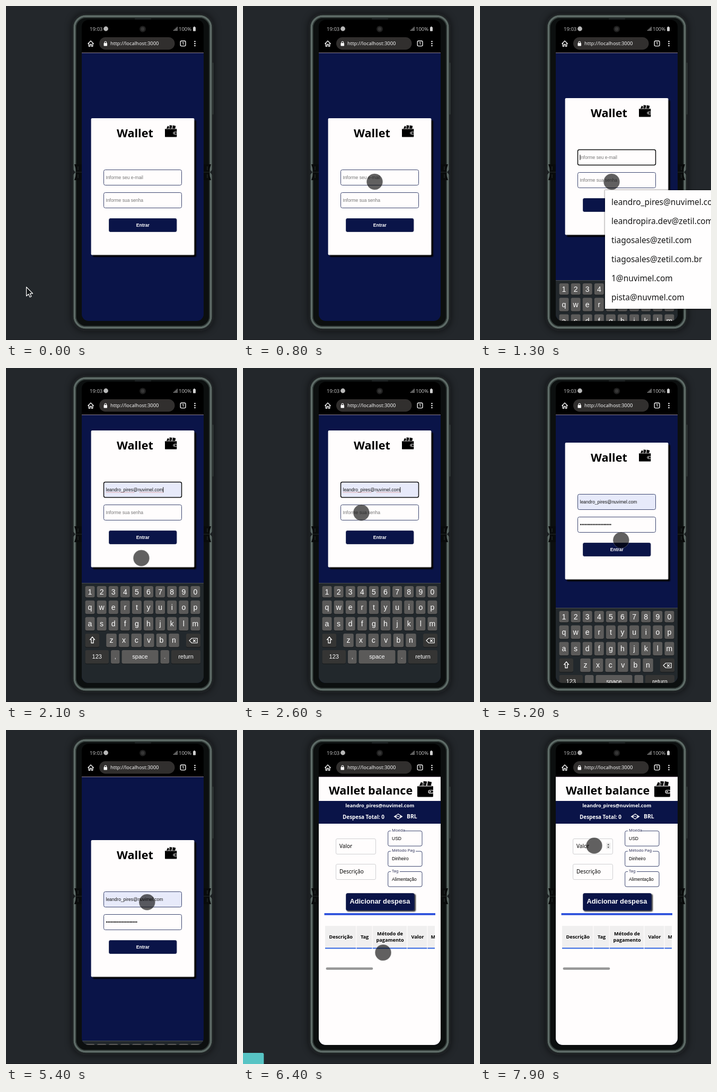
Recreate the animation shown at these times as an HTML page. Size 436 px wide and 631 px high, loop 8 s.

```html
<!DOCTYPE html>
<html lang="pt-BR">
<head>
<meta charset="utf-8">
<title>Wallet</title>
<style>
  html, body { margin: 0; width: 100%; height: 100%; overflow: hidden; background: #23272b; }
  svg { display: block; width: 100vw; height: 100vh; }
  text { white-space: pre; }
  .ui { font-family: "Noto Sans", "Open Sans", sans-serif; }
  .bold { font-family: "Open Sans", "Noto Sans", sans-serif; font-weight: 700; }
  .form { font-family: "Liberation Sans", Arial, sans-serif; font-size: 8.5px; }
  .mid { text-anchor: middle; }
</style>
</head>
<body>
<svg id="stage" viewBox="0 0 436 631" xmlns="http://www.w3.org/2000/svg"></svg>
<script>
const LOOP = 8000, STEP = 100;
const NAVY = '#0a1448', PAPER = '#fffdfd', LINE = '#3b456f';
const EMAIL = 'leandro_pires@nuvimel.com';
const SUGGESTIONS = [EMAIL, 'leandropira.dev@zetil.com', 'tiagosales@zetil.com',
  'tiagosales@zetil.com.br', '1@nuvimel.com', 'pista@nuvmel.com'];

// markup helpers
const rect = (x, y, w, h, fill, more = '') =>
  `<rect x="${x}" y="${y}" width="${w}" height="${h}" fill="${fill}" ${more}/>`;
const label = (x, y, str, cls, size, fill = '#000', more = '') =>
  `<text x="${x}" y="${y}" class="${cls}" style="font-size:${size}px" fill="${fill}" ${more}>${str}</text>`;
const path = (d, more) => `<path d="${d}" ${more}/>`;
const dot = (x, y, r, fill) => `<circle cx="${x}" cy="${y}" r="${r}" fill="${fill}"/>`;
const pen = (color, width = 1) => `fill="none" stroke="${color}" stroke-width="${width}"`;
const each = (list, fn) => list.map(fn).join('');

const defs = `<defs>
  <clipPath id="screen"><rect x="143" y="26" width="230" height="569" rx="13"/></clipPath>
  <clipPath id="table"><rect x="155" y="365" width="207" height="60"/></clipPath>
  <filter id="blur" x="-20%" y="-20%" width="140%" height="140%"><feGaussianBlur stdDeviation="7"/></filter>
  <filter id="soft" x="-10%" y="-10%" width="120%" height="120%"><feGaussianBlur stdDeviation="1.2"/></filter>
</defs>`;

function phone() {
  // nested outlines from the outer edge inwards
  const ring = (inset, color, width) => rect(126.5 + inset, 16.5 + inset, 263 - inset * 2, 594 - inset * 2,
    'none', `rx="${24 - inset}" stroke="${color}" stroke-width="${width}"`);
  const hinge = path('M126 308 131 314 126 320Z', 'fill="#1c2022"') +
    path('M129 299H143V329H129L132 319V309Z', 'fill="#090b0b"') +
    path('M132 314H143M136 303V310M136 318V325', pen('#262c2b', 1.2));
  return rect(0, 630, 436, 1, '#191c1f') +
    rect(124, 14, 268, 600, '#0d0f11', 'rx="26" opacity=".6" filter="url(#blur)"') +
    rect(389, 107, 2.5, 98, '#343d3a', 'rx="1"') +
    rect(126.5, 16.5, 263, 594, '#0c0f0f', 'rx="24"') +
    ring(.5, '#2f3836', 1.2) + ring(2.8, '#5f6c68', 3.4) + ring(5.4, '#333d3a', 1.6) +
    rect(243, 23, 31, 2.5, '#1d2122', 'rx="1.2"') +
    hinge + `<g transform="matrix(-1 0 0 1 516 0)">${hinge}</g>`;
}

function chrome() {
  let s = rect(143, 26, 230, 63, '#000');
  s += label(158, 47, '19:03', 'ui', 9.5, '#bdbdbd') + dot(188.5, 43, 4.4, '#b8b8b8');
  s += dot(258, 43.5, 6, '#1f1f1f') + dot(258, 43.5, 3.4, '#363636');
  for (let i = 0; i < 4; i++) s += rect(316 + i * 2.1, 45 - i * 1.9, 1.4, 2 + i * 1.9, '#8d8d8d');
  s += label(326, 47, '100%', 'ui', 9.5, '#bdbdbd');
  s += rect(353, 40, 5, 7.5, '#d0d0d0', 'rx=".8"') + rect(354.3, 38.8, 2.4, 2, '#d0d0d0');
  s += path('M154.5 71.5 160 66 165.5 71.5M156.3 70V76H158.6V72.5H161.4V76H163.7V70', pen('#fff', 1.3));
  s += rect(176, 59, 142.5, 23.5, '#312f2e', 'rx="11.7"');
  s += rect(184.5, 70, 6.5, 5.5, '#fff', 'rx=".8"') + path('M186 70V68.8a1.8 1.8 0 0 1 3.6 0V70', pen('#fff', 1.1));
  s += label(197, 74, 'http://localhost:3000', 'ui', 9.4, '#f4f4f4');
  s += rect(329.2, 66, 9.8, 9.6, 'none', 'rx="2" stroke="#fff" stroke-width="1.3"');
  s += label(334.1, 73.3, '1', 'bold mid', 6.5, '#fff');
  s += each([67, 71, 75], y => dot(356.5, y, 1.25, '#fff'));
  return s + rect(143, 88, 230, 1, '#8d7f90');
}

function purse(x, y, k) {
  return `<g transform="translate(${x} ${y}) scale(${k})">` +
    path('M2.5 8 5 2.2 9.5 4 8.5 8ZM6.5 8 8.8.8 14 1.6 12.6 8ZM13.5 8 14.6 1 20.6 2.4 19.5 8Z',
      `fill="#000" stroke="${PAPER}" stroke-width=".6"`) +
    rect(0, 8, 22.3, 15.6, '#000', 'rx="1.2"') + path('M1 8.6H21', pen(PAPER, .4)) +
    rect(15.8, 14, 7, 4.2, '#000', `rx="2" stroke="${PAPER}" stroke-width=".9"`) +
    dot(18.2, 16.1, .9, PAPER) + '</g>';
}

function login() {
  const input = (id, y) => rect(184.5, y, 147, 29, PAPER, `id="${id}Box" rx="3"`) +
    `<text id="${id}" x="188.5" y="${y + 17.5}" class="form"></text>`;
  return rect(143, 88, 230, 507, NAVY) + '<g id="card">' +
    rect(164, 4, 195, 258, '#000', 'rx="2" filter="url(#soft)"') +
    rect(160.6, 0, 194.8, 258.5, PAPER, 'rx="2"') +
    path('M162 258.2H355.2V1', pen('#8a8a90', .8)) +
    label(209, 36, 'Wallet', 'bold', 21.6) + purse(300, 12, 1) +
    input('mail', 97.5) + input('pass', 140.5) +
    path('M189 117H243M252 117H297', pen('#d0564f', .9) + ' id="spell" stroke-dasharray="1 1"') +
    rect(0, 0, .9, 10, '#000', 'id="caret"') +
    rect(194.5, 189.5, 127.5, 25, NAVY, 'rx="2.5" stroke="#30375e"') +
    label(258.3, 205, 'Entrar', 'form mid', 8.5, '#fff', 'font-weight="700"') + '</g>';
}

function keyboard() {
  const DARK = '#353534', PITCH = 31.25;
  let s = rect(143, 0, 230, 190, '#22282c') + rect(143, 0, 230, 1, '#4a4e50');
  const key = (row, x, w, str, size = 14, fill = '#5b5a59') => {
    const y = Math.max(6, 2 + row * PITCH), h = 27.5 + row * PITCH - y;
    s += rect(x, y + 1, w, h, '#15181a', 'rx="3"') + rect(x, y, w, h, fill, 'rx="3"') +
      label(x + w / 2, y + h / 2 + size * .34, str, 'form mid', size, '#fff');
  };
  ['1234567890', 'qwertyuiop', 'asdfghjklm'].forEach((keys, row) =>
    [...keys].forEach((c, i) => key(row, 149.5 + i * 22.1, 18, c)));
  [...'zxcvbn'].forEach((c, i) => key(3, 189.2 + i * 23.6, 19.6, c));
  key(3, 149.5, 26.5, '', 14, DARK);
  key(3, 340, 27, '', 14, DARK);
  key(4, 149.5, 44.5, '123', 11, DARK);
  key(4, 198, 16.5, ',', 11);
  key(4, 218.5, 69, 'space', 11);
  key(4, 291.5, 16.5, '.', 11);
  key(4, 312, 55, 'return', 11, DARK);
  s += path('M163 102 167.2 107.2H165V113.5H161V107.2H158.8Z', pen('#fff', 1.3));
  s += path('M346 109 350.5 104.5H361V113.5H350.5ZM353 106.7 358 111.5M358 106.7 353 111.5', pen('#fff', 1.2));
  return `<g id="keys">${s}</g>`;
}

function balance() {
  let s = rect(143, 89, 230, 506, PAPER) + rect(143, 88, 230, 1, '#efdfe6');
  s += label(162, 122, 'Wallet balance', 'bold', 21.5) + purse(329, 95, 1.34);
  s += rect(143, 134, 230, 43, NAVY) + label(258.3, 146, EMAIL, 'bold mid', 9.25, '#fff');
  s += label(188, 167.5, 'Despesa Total: 0', 'bold', 9.9, '#fff') + label(309, 167, 'BRL', 'bold', 10.4, '#fff');
  s += path('M284.5 163.5 293 158 301.5 163.5 293 169Z', 'fill="#fff"') + dot(293, 163.5, 3.6, NAVY) +
    path('M289.8 163Q293 162 296 165', pen('#fff'));
  s += each(['Valor', 'Descrição'], (str, i) =>
    rect(175.5, 205.5 + i * 48, 75, 29, PAPER, 'rx="2.5" stroke="#d0d0d2"') +
    label(182, 223.2 + i * 48, str, 'ui', 10));
  s += each([['Moeda', 'USD'], ['Método Pag', 'Dinheiro'], ['Tag', 'Alimentação']], ([name, value], i) => {
    const y = 190.7 + i * 38.4;
    return rect(273.7, y, 64.3, 28.5, PAPER, `rx="3" stroke="${LINE}"`) +
      rect(279, y - 1, 4 + name.length * 4.3, 2, PAPER) +
      label(281, y + 1.3, name, 'ui', 7.6, '#2c3158') + label(281, y + 17.3, value, 'form', 8.5);
  });
  s += rect(196, 310, 130, 33, '#000', 'rx="3" opacity=".8" filter="url(#soft)"') +
    rect(194.5, 308.5, 129, 32.5, NAVY, 'rx="3" stroke="#30375c" stroke-width=".8"') +
    label(258.4, 328.2, 'Adicionar despesa', 'form mid', 12.8, '#fff', 'font-weight="700"');
  s += rect(153.5, 346, 209.5, 3.8, '#2c50dc');

  let x = 155;
  s += '<g clip-path="url(#table)">';
  [['Descrição', 59.4], ['Tag', 30.4], ['Método de|pagamento', 65.5], ['Valor', 38.2], ['Moeda', 43]].forEach(([name, w]) => {
    const lines = name.split('|');
    s += rect(x, 370, w - 1.2, 41.3, '#f0efef') + rect(x, 411.3, w - 1.2, 2, '#2f63e0') +
      each(lines, (str, i) => label(x + w / 2, 394 + (i * 2 - lines.length + 1) * 5.7, str, 'bold mid', 9.2));
    x += w;
  });
  s += '</g>' + rect(156.5, 448.5, 88.8, 4.6, '#979797', 'rx="2.3"');
  s += '<g id="spin">' + rect(238, 213, 8.5, 12, '#ececec', 'rx="1"') +
    path('M240.3 217.6 242.2 215 244.1 217.6ZM240.3 220.4 242.2 223 244.1 220.4Z', 'fill="#444"') + '</g>';
  return `<g id="balance">${s}</g>`;
}

function popup() {
  return '<g id="popup">' + rect(235, 347, 220, 227, '#000', 'opacity=".35" filter="url(#soft)"') +
    rect(236, 348, 220, 224, '#fffefe') + rect(236, 352, 220, 36, '#e6e6e6', 'id="hover"') +
    each(SUGGESTIONS, (str, i) => label(248, 375.5 + i * 36, str, 'ui', 15.4, '#161616')) + '</g>';
}

const stage = document.getElementById('stage');
stage.innerHTML = defs + phone() +
  `<g clip-path="url(#screen)">${login()}${keyboard()}${balance()}${chrome()}</g>` + popup() +
  rect(-4, 0, 43.3, 30, '#57c4c4', 'id="bubble" rx="3"') +
  '<circle id="touch" r="15.3" fill="#000" stroke="#fff" stroke-opacity=".3" stroke-width=".8"/>' +
  path('M0 0V17L4 13.3 6.6 19 9.4 17.8 6.8 12.2H12Z',
    'id="arrow" fill="#15181a" stroke="#fff" stroke-width="1.2" stroke-linejoin="round"');

const el = {};
stage.querySelectorAll('[id]').forEach(n => el[n.id] = n);

// pointer moves: start, end, x, y, sideways bend
const HOME = [38.5, 531];
const MOVES = [
  [300, 800, 248.5, 332, 55],
  [1600, 1900, 258, 366, 0],
  [2000, 2600, 223.3, 273.3, 0],
  [4500, 4600, 254.3, 307, 0],
  [4800, 4900, 266.3, 325.2, 0],
  [5600, 6100, 264.5, 420.5, 0],
  [6500, 6900, 288, 462.7, 68],
  [7200, 7300, 278, 473, 0],
  [7500, 7900, 215.5, 218.5, 98]];

const mix = (a, b, p) => a + (b - a) * p;
const within = (t, a, b) => t >= a && t < b;
function ease(t, a, b) {
  const p = Math.min(1, Math.max(0, (t - a) / (b - a)));
  return p * p * (3 - 2 * p);
}

function pointer(t) {
  let [x, y] = HOME;
  for (const [a, b, toX, toY, bend] of MOVES) {
    const p = ease(t, a, b);
    x = mix(x, toX, p) + bend * Math.sin(Math.PI * p);
    y = mix(y, toY, p);
  }
  return [x, y];
}

const keysHeight = t => t < 5700 ? mix(189 * ease(t, 1145, 1500), 8, ease(t, 5100, 5400)) : 0;

// one key press, then auto-repeat
function typedCount(t) {
  if (t < 3400) return 0;
  return t < 3900 ? 1 : Math.min(20, 2 + Math.floor((t - 3900) / 27.5));
}

const show = (node, on) => node.setAttribute('visibility', on ? 'inherit' : 'hidden');
const move = (node, x, y) => node.setAttribute('transform', `translate(${x} ${y})`);

function field(box, text, str, hint, focus, fill) {
  box.setAttribute('stroke', focus ? '#0c0c0c' : LINE);
  box.setAttribute('stroke-width', focus ? 1.5 : 1);
  box.setAttribute('fill', fill);
  text.textContent = str || hint;
  text.setAttribute('fill', str ? '#111' : '#757575');
}

function draw(t) {
  const [x, y] = pointer(t), h = Math.round(keysHeight(t));
  move(el.card, 0, Math.round(212 - h / 2));
  move(el.keys, 0, 595 - h);
  show(el.keys, h > 0);

  const onMail = within(t, 1200, 3000), onPass = within(t, 3000, 5200);
  const mail = t >= 1700 ? EMAIL : '', dots = typedCount(t);
  field(el.mailBox, el.mail, mail, 'Informe seu e-mail', onMail, mail ? '#e7eafa' : PAPER);
  field(el.passBox, el.pass, '•'.repeat(dots), 'Informe sua senha', onPass, PAPER);
  show(el.spell, within(t, 2100, 3000));
  show(el.caret, onMail || (onPass && t < 4900 && !within(t, 3200, 3400)));
  const filled = onMail ? t >= 2100 : dots > 0;
  const offset = filled ? (onMail ? el.mail : el.pass).getComputedTextLength() : 0;
  move(el.caret, 188.5 + offset, onMail ? 107 : 150);

  const open = within(t, 1200, 2100);
  show(el.popup, open);
  show(el.hover, open && t >= 1700);
  show(el.balance, t >= 6300);
  show(el.spin, t >= 7900);
  move(el.bubble, 0, 632 - 22 * (ease(t, 6200, 6400) - ease(t, 6500, 6700)));

  const arrow = x < 143 || (open && t >= 1700);
  show(el.arrow, arrow);
  show(el.touch, !arrow);
  move(el.arrow, x, y);
  move(el.touch, x, y);
  el.touch.setAttribute('fill-opacity', within(t, 7100, 7300) ? .7 : .62);
}

const start = performance.now();
function tick() {
  const t = (performance.now() - start) % LOOP;
  draw(Math.floor(t / STEP) * STEP);
  requestAnimationFrame(tick);
}
tick();
</script>
</body>
</html>
```
